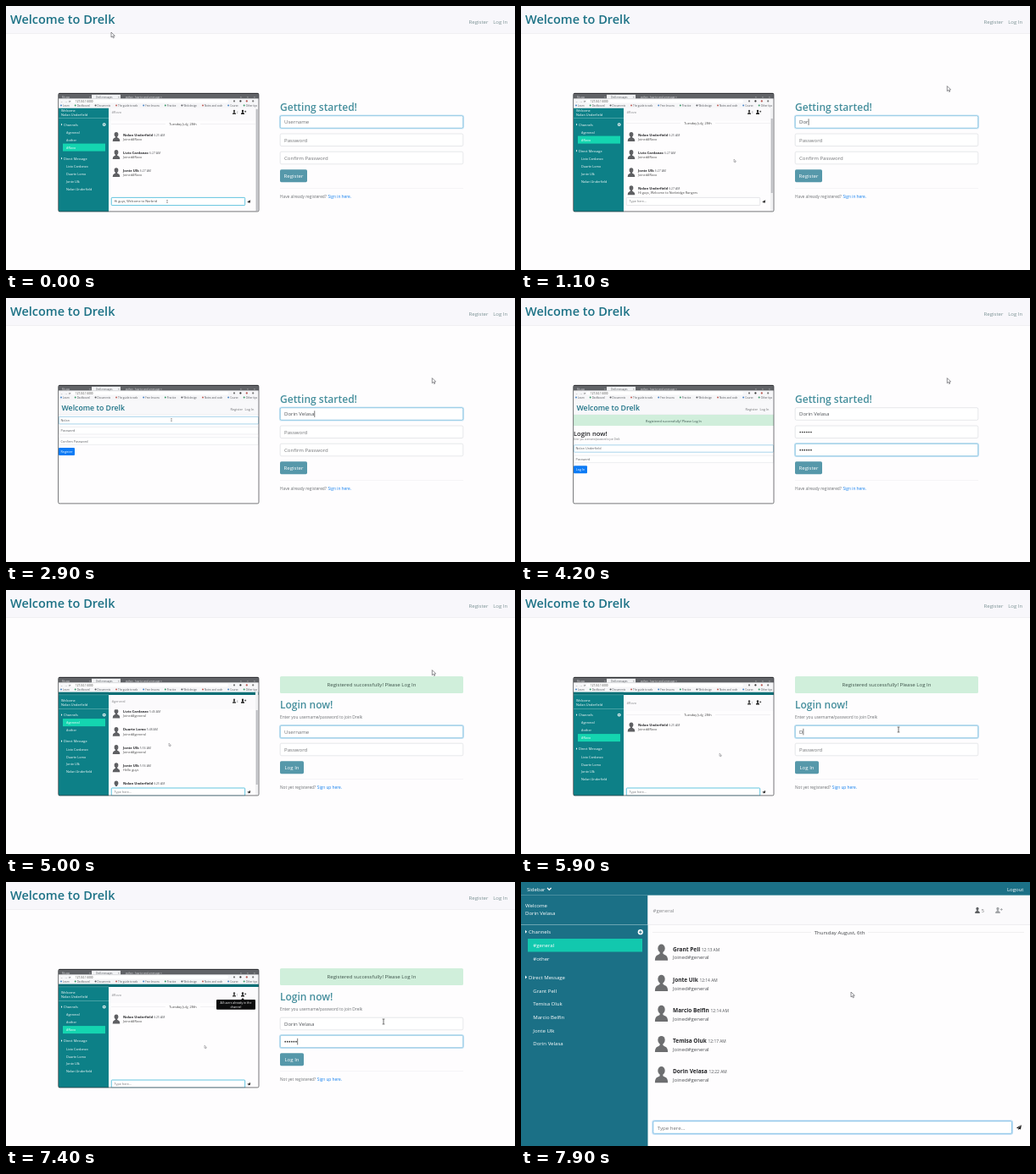
An HTML page with a canvas for the animation above (8 s loop, 600 by 312 pixels).

```html
<!DOCTYPE html>
<html lang="en">
<head>
<meta charset="utf-8">
<title>Chat sign-up demo</title>
<style>
  html, body { margin: 0; width: 100%; height: 100%; overflow: hidden; background: #fefdfe; }
  canvas { display: block; width: 600px; height: 312px; }
</style>
</head>
<body>
<canvas id="stage"></canvas>
<script>
const LOOP = 8000;
const LOGIN_AT = 4700, CHAT_AT = 7600;
const APP = 'Drelk';
const USER = 'Dorin Velasa';
const HOST = 'Nolan Underfield';
const ROOM = '#Rovo';
const MINI_USERS = ['Livio Cardanzo', 'Duarte Lomo', 'Jonte Ulk', HOST];
const TEAL = '#1d7286', HEAD = '#468f9d', MINI_TEAL = '#0d8087';
const GREY = '#717376', DARK = '#222326', BLUE = '#1580ee';

const canvas = document.getElementById('stage');
const dpr = Math.max(1, window.devicePixelRatio || 1);
canvas.width = 600 * dpr;
canvas.height = 312 * dpr;
const c = canvas.getContext('2d');

const clamp = v => Math.max(0, Math.min(1, v));
const span = (t, a, b) => clamp((t - a) / (b - a));
const ease = u => u * u * (3 - 2 * u);
const typed = (s, t, a, b, from = 0) =>
  s.slice(0, from + Math.floor((s.length - from) * span(t, a, b) + 1e-6));

function text(s, x, y, size, color = DARK, weight = 400, align = 'left') {
  c.font = `${weight} ${size}px "Open Sans", "Noto Sans", sans-serif`;
  c.textAlign = align;
  c.fillStyle = color;
  c.fillText(s, x, y);
  return c.measureText(s).width;
}

function rect(x, y, w, h, fill) {
  c.fillStyle = fill;
  c.fillRect(x, y, w, h);
}

function round(x, y, w, h, r, fill, stroke, line = 0.7) {
  c.beginPath();
  c.roundRect(x, y, w, h, r);
  if (fill) { c.fillStyle = fill; c.fill(); }
  if (stroke) { c.strokeStyle = stroke; c.lineWidth = line; c.stroke(); }
}

function poly(points, fill, stroke, line = 0.7) {
  c.beginPath();
  points.forEach(([x, y], i) => i ? c.lineTo(x, y) : c.moveTo(x, y));
  c.closePath();
  if (fill) { c.fillStyle = fill; c.fill(); }
  if (stroke) { c.strokeStyle = stroke; c.lineWidth = line; c.stroke(); }
}

function dot(x, y, r, fill) {
  c.beginPath();
  c.arc(x, y, r, 0, 7);
  c.fillStyle = fill;
  c.fill();
}

function at(x, y, scale, draw) {
  c.save();
  c.translate(x, y);
  c.scale(scale, scale);
  draw();
  c.restore();
}

// Bust icon, 16 wide and 20 high, centred on x, y
function bust(x, y, scale, color = '#6d6e70') {
  at(x, y, scale, () => {
    c.beginPath();
    c.ellipse(0, -5, 4.4, 5.2, 0, 0, 7);
    c.fillStyle = color;
    c.fill();
    rect(-2, -2, 4, 5, color);
    c.beginPath();
    c.moveTo(-8, 10);
    c.quadraticCurveTo(-8, 4, -4.5, 3);
    c.lineTo(-1.8, 1.5);
    c.lineTo(1.8, 1.5);
    c.lineTo(4.5, 3);
    c.quadraticCurveTo(8, 4, 8, 10);
    c.fill();
  });
}

function addUser(x, y, s, color) {
  bust(x, y, s, color);
  rect(x + 8 * s, y - 3.6 * s, 8 * s, 2.4 * s, color);
  rect(x + 10.8 * s, y - 6.4 * s, 2.4 * s, 8 * s, color);
}

function plane(x, y, s) {
  at(x, y, s, () => {
    poly([[3, -3], [-3, 0.4], [-1.4, 1.2]], '#111');
    poly([[3, -3], [-0.9, 1.4], [-0.9, 3], [0.2, 1.8], [1.9, 2.5]], '#111');
  });
}

function plus(x, y, r, bg) {
  dot(x, y, r, '#fff');
  rect(x - r * 0.6, y - r * 0.15, r * 1.2, r * 0.3, bg);
  rect(x - r * 0.15, y - r * 0.6, r * 0.3, r * 1.2, bg);
}

function caretRight(x, y, s) {
  poly([[x, y - s], [x + s, y], [x, y + s]], '#fff');
}

function arrow(x, y, s = 0.95) {
  at(x, y, s, () => poly([[0, 0], [0, 6.3], [1.5, 5], [2.5, 7.2], [3.6, 6.7], [2.6, 4.6], [4.5, 4.5]],
    '#fff', '#5a5a60', 0.7));
}

function beam(x, y, s = 1) {
  at(x, y, s, () => {
    rect(-0.35, -3, 0.7, 6, '#333');
    rect(-1.4, -3.3, 2.8, 0.6, '#333');
    rect(-1.4, 2.7, 2.8, 0.6, '#333');
  });
}

function input(y, value, hint, focus, caret) {
  if (focus > 0) {
    c.globalAlpha = focus;
    round(322.5, y - 0.5, 217, 16, 2.2, null, '#cfe8f7', 1.2);
    c.globalAlpha = 1;
  }
  round(323.2, y + 0.2, 215.6, 14.6, 1.6, '#fff', '#d6d7dc', 0.6);
  if (focus > 0) {
    c.globalAlpha = focus;
    round(323.2, y + 0.2, 215.6, 14.6, 1.6, null, '#7cc5e6', 0.8);
    c.globalAlpha = 1;
  }
  let w = 0;
  if (value[0] === '•') {
    for (let i = 0; i < value.length; i++) dot(329.2 + i * 2.55, y + 7.7, 0.85, '#333');
    w = value.length * 2.55;
  } else if (value) {
    w = text(value, 328, y + 9.8, 6.05, '#4c5055');
  } else {
    text(hint, 328, y + 9.8, 6.05, GREY);
  }
  if (caret) rect(328.2 + w, y + 3.8, 0.6, 7.6, '#222');
}

function button(y, w, label) {
  round(323, y, w, 15, 1.6, '#5698aa');
  text(label, 323 + w / 2, y + 9.8, 6.05, '#fff', 400, 'center');
}

function footer(y, question, link) {
  rect(323, y, 216, 0.5, '#ebeaee');
  const w = text(question + ' ', 323, y + 12.3, 4.8, '#6e7175');
  text(link, 323 + w + 0.4, y + 12.3, 4.8, BLUE);
}

const focusOf = (t, a, b) => Math.min(span(t, a, a + 150), 1 - span(t, b, b + 150));

function registerForm(t) {
  text('Getting started!', 323, 124, 12, HEAD, 600);
  const pass = '••••••';
  const name = t < 2000 ? typed(USER.slice(0, 5), t, 700, 1350) : typed(USER, t, 2000, 2800, 5);
  const caret = (t > 700 && t < 1850) || (t > 2000 && t < 3000);
  input(129.5, name, 'Username', focusOf(t, -200, 3000), caret);
  input(150.8, typed(pass, t, 3100, 3450), 'Password', focusOf(t, 3000, 3550), false);
  input(172, typed(pass, t, 3650, 4050), 'Confirm Password', focusOf(t, 3550, LOGIN_AT), false);
  button(193.2, 32, 'Register');
  footer(215, 'Have already registered?', 'Sign in here.');
}

function loginForm(t) {
  round(323, 102, 216, 20, 1.6, '#d0efdb');
  text('Registered successfully! Please Log In', 431, 114.4, 6.05, '#3c5149', 400, 'center');
  text('Login now!', 323, 140.3, 12, HEAD, 600);
  text(`Enter you username/password to join ${APP}`, 323, 152, 4.8, '#6e7175');
  const tab = 6780;
  input(160, typed(USER, t, 5800, 6600), 'Username', focusOf(t, LOGIN_AT - 150, tab), t > 5700 && t < tab);
  input(181, typed('••••••', t, 6900, 7400), 'Password', focusOf(t, tab, LOOP), t > tab);
  button(202.2, 28, 'Log In');
  footer(223, 'Not yet registered?', 'Sign up here.');
}

// Small recorded browser on the left

function miniBrowser() {
  rect(62, 103, 236, 1.6, '#1c1d20');
  rect(62, 104.6, 236, 5, '#606266');
  rect(101, 104.8, 34, 4.8, '#f1f2f4');
  text('My app', 66, 108.5, 2.7, '#d5d6da');
  text(APP + ' messages', 106, 108.5, 2.7, '#55585d');
  text('python - how to send a message', 141, 108.5, 2.7, '#e2e3e6');
  for (const x of [98, 132, 182, 276, 284, 292]) text('×', x, 108.6, 3.2, x === 132 ? '#555' : '#ddd');
  rect(62, 109.6, 236, 10.9, '#f6f6f8');
  text('←  →  ⟳', 64, 113.6, 3.2, '#555');
  round(77, 110.4, 185, 4, 2, '#fff');
  text('127.0.0.1:5000', 82, 113.6, 3, '#333');
  for (let i = 0; i < 4; i++) dot(269 + i * 7.4, 112.4, 1.1, ['#777', '#333', '#b5534d', '#777'][i]);
  const marks = ['Learn', 'Dashboard', 'Documents', 'The guide to web', 'Free lessons', 'Practice', 'Web design', 'Notes and code', 'Course', 'Other tips'];
  let x = 65;
  marks.forEach((m, i) => {
    dot(x, 117.6, 1, ['#4d87c7', '#3b9a68', '#55585d', '#c0605a'][i % 4]);
    x += text(m, x + 2, 118.6, 2.9, '#55585d') + 9;
  });
}

function miniField(y, h, value, focused) {
  round(62.3, y, 235.4, h, 0.8, '#fff', focused ? '#93cbe6' : '#e3e4e8', focused ? 0.8 : 0.6);
  text(value, 64.5, y + h / 2 + 1.4, 3.75, '#595c61');
}

function miniNav() {
  rect(62, 120, 236, 18, '#f8f8fa');
  rect(62, 137.6, 236, 0.5, '#e6e7ea');
  text('Welcome to ' + APP, 65.5, 132.6, 8.75, TEAL, 600);
  text('Register', 264.5, 132.8, 3.9, GREY);
  text('Log In', 281.5, 132.8, 3.9, GREY);
}

function miniButton(y, w, label) {
  round(62, y, w, 9, 1, '#0d7bf5');
  text(label, 62 + w / 2, y + 5.8, 3.7, '#fff', 400, 'center');
}

function miniRegister(t) {
  miniNav();
  miniField(140.3, 8.6, typed(HOST, t, 2650, 3350), t < 3400);
  miniField(152.4, 8.6, typed('••••••', t, 3400, 3550) || 'Password', t >= 3400 && t < 3600);
  miniField(164.8, 8.6, typed('••••••', t, 3600, 3780) || 'Confirm Password', t >= 3600);
  miniButton(177, 19, 'Register');
  beam(195, 144, 0.55);
}

function miniLogin(t) {
  miniNav();
  rect(62, 138, 236, 13, '#d0eedb');
  text('Registered successfully! Please Log In', 180, 147.4, 3.8, '#35514a', 400, 'center');
  text('Login now!', 62, 162.8, 7.6, DARK, 600);
  text('Enter you username/password to join ' + APP, 62, 168.4, 2.7, GREY);
  miniField(173.8, 8.4, typed(HOST, t, 3900, 4150) || 'Username', t < 4300);
  miniField(186.2, 8.4, typed('••••••', t, 4350, 4550) || 'Password', t >= 4300);
  miniButton(198.2, 16, 'Log In');
}

function miniSidebar(y, rooms, active) {
  rect(62, 120.5, 59, 123, MINI_TEAL);
  text('Welcome', 65, y, 3.9, '#fff');
  text(HOST, 65, y + 5, 3.9, '#fff');
  rect(62, y + 8, 59, 0.5, '#7fc0c3');
  y += 17;
  caretRight(65, y - 1.4, 1.3);
  text('Channels', 68, y, 3.9, '#fff');
  plus(115.7, y - 1.4, 1.9, MINI_TEAL);
  for (const room of rooms) {
    y += 9;
    if (room === active) rect(67, y - 5.9, 50, 9, '#14d5b0');
    text(room, 71, y, 3.8, '#fff');
  }
  y += 13;
  caretRight(65, y - 1.4, 1.3);
  text('Direct Message', 68, y, 3.9, '#fff');
  MINI_USERS.forEach((name, i) => text(name, 71, y + 9.8 + i * 8.8, 3.8, '#fff'));
}

function miniMessage(y, name, time, body) {
  bust(130, y + 1, 0.54, '#5f6063');
  const w = text(name + ' ', 138, y, 4.1, DARK, 700);
  text(time, 138 + w, y, 3.5, '#55575b');
  text(body, 138, y + 5.3, 3.8, '#444');
}

function miniHead(y, room, count) {
  rect(121, 120.5, 177, y - 112, '#fbfafc');
  text(room, 124.5, y, 3.9, '#85878a');
  bust(269, y - 1.6, 0.26, '#444');
  text(count, 271.8, y, 3, GREY);
  addUser(279, y - 1.6, 0.26, '#222');
}

function miniDate(y) {
  rect(124, y - 1.4, 170, 0.4, '#dddde0');
  rect(188, y - 4, 41, 6, '#fefdfe');
  text('Tuesday July, 28th', 208.5, y, 3.9, '#444', 400, 'center');
}

function miniCompose(y, value, focused) {
  rect(121, y - 2, 177, 245 - y, '#fefdfe');
  round(124.3, y, 157.4, 9.2, 0.8, '#fff', focused ? '#52bfdc' : '#d5d6da', focused ? 0.9 : 0.6);
  text(value || 'Type here...', 127.5, y + 6, 3.8, value ? '#444' : GREY);
  plane(286.3, y + 4.7, 0.65);
}

function miniScroll(y, h) {
  rect(294, 120.5, 3.5, 122, '#f1f1f3');
  rect(294.7, y, 2, h, '#bcbdc1');
}

function miniRoom(t) {
  const line = 'Hi guys, Welcome to Norbridge Rangers';
  const sent = t >= 800;
  miniSidebar(124.5, sent ? ['#general', ROOM] : ['#general', '#other', ROOM], ROOM);
  miniHead(127, ROOM, sent ? '3' : '2');
  miniDate(sent ? 140 : 141);
  miniMessage(153.5, HOST, '6:25 AM', 'Joined' + ROOM);
  miniMessage(174.6, MINI_USERS[0], '6:27 AM', 'Joined' + ROOM);
  miniMessage(195.7, MINI_USERS[2], '6:27 AM', 'Joined' + ROOM);
  if (sent) miniMessage(216.8, HOST, '6:27 AM', line);
  miniCompose(226.4, sent ? '' : typed(line, t, 0, 650, 27), !sent);
  miniScroll(sent ? 133 : 122, sent ? 88 : 120);
  if (sent) arrow(251, 181, 0.55);
  else beam(190, 231, 0.55);
}

function miniTop() {
  rect(62, 120.5, 236, 3.5, '#096e75');
  rect(62, 123.7, 59, 0.4, '#7fc0c3');
}

function miniGeneral() {
  miniSidebar(132, ['#general', '#other'], '#general');
  miniMessage(145, MINI_USERS[0], '5:46 AM', 'Joined#general');
  miniMessage(166.4, MINI_USERS[1], '5:48 AM', 'Joined#general');
  miniMessage(187.6, MINI_USERS[2], '5:56 AM', 'Joined#general');
  miniMessage(208.8, MINI_USERS[2], '5:56 AM', 'Hello guys');
  miniMessage(230, HOST, '6:25 AM', 'Joined#general');
  miniHead(132.8, '#general', '4');
  miniTop();
  miniCompose(234, '', true);
  miniScroll(142, 88);
  arrow(192, 181, 0.55);
}

function miniNewRoom(t) {
  miniSidebar(132, ['#general', '#other', ROOM], ROOM);
  miniHead(134.5, ROOM, '1');
  miniTop();
  miniDate(148.5);
  miniMessage(161, HOST, '6:25 AM', 'Joined' + ROOM);
  miniCompose(234, '', true);
  if (t > 6500) {
    round(248, 139, 46, 11.8, 1, '#0c0c0d');
    poly([[277, 139.2], [279, 137], [281, 139.2]], '#0c0c0d');
    text('All users already in the', 271, 143.8, 3.5, '#fff', 400, 'center');
    text('channel', 271, 148.6, 3.5, '#fff', 400, 'center');
  }
  arrow(234, 193, 0.55);
}

function preview(t) {
  c.save();
  c.beginPath();
  c.roundRect(61.5, 103, 236.8, 140.3, 1.8);
  c.clip();
  rect(60, 102, 240, 143, '#fefdfe');
  if (t < 2300) miniRoom(t);
  else if (t < 3850) miniRegister(t);
  else if (t < 4650) miniLogin(t);
  else if (t < 5900) miniGeneral();
  else miniNewRoom(t);
  miniBrowser();
  c.restore();
  round(61.6, 103.2, 236.4, 139.7, 1.6, null, '#3a3b3f', 0.7);
}

function signPage(t) {
  rect(0, 0, 600, 32.5, '#f8f7fb');
  rect(0, 32.2, 600, 0.6, '#e9e8ed');
  text('Welcome to ' + APP, 5, 21.2, 14.5, TEAL, 600);
  text('Register', 545.6, 20.6, 6.05, '#7b9294');
  text('Log In', 574.2, 20.6, 6.05, '#7b9294');
  preview(t);
  if (t < LOGIN_AT) registerForm(t);
  else loginForm(t);
}

function chatPage() {
  rect(0, 0, 149.5, 312, '#1b7086');
  rect(0, 0, 600, 15.5, '#1b7086');
  rect(0, 15.2, 600, 0.7, '#5c9bab');
  const w = text('Sidebar', 7, 10.5, 6.05, '#fff');
  c.beginPath();
  c.moveTo(7 + w + 2.5, 7);
  c.lineTo(7 + w + 4.8, 9.4);
  c.lineTo(7 + w + 7.1, 7);
  c.strokeStyle = '#fff';
  c.lineWidth = 1.2;
  c.stroke();
  text('Logout', 592.5, 10.5, 6.05, '#fff', 400, 'right');

  const people = ['Grant Pell', 'Jonte Ulk', 'Marcio Belfin', 'Temisa Oluk', USER];
  text('Welcome', 5, 29.5, 6.05, '#fff');
  text(USER, 5, 39, 6.05, '#fff');
  rect(0, 50.3, 149.5, 0.7, '#8dbac5');
  caretRight(5, 58.8, 2);
  text('Channels', 9, 61.2, 6.05, '#fff');
  plus(140.8, 59.2, 3.1, '#1b7086');
  rect(8, 67, 135, 15.5, '#12c8ae');
  text('#general', 14.3, 77, 6.05, '#fff');
  text('#other', 14.3, 92.8, 6.05, '#fff');
  caretRight(5, 112.4, 2);
  text('Direct Message', 9, 114.8, 6.05, '#fff');
  [0, 3, 2, 1, 4].forEach((p, i) => text(people[p], 14.3, 130.6 + i * 15.7, 6.05, '#fff'));

  rect(149.5, 16, 450.5, 34.5, '#fbfafc');
  rect(149.5, 50.4, 450.5, 0.6, '#e6e5e9');
  text('#general', 155.5, 35.8, 6.05, '#85878a');
  bust(538, 33.3, 0.36, '#5f6164');
  text('5', 542.8, 35.8, 5.6, GREY);
  addUser(562, 33.3, 0.36, '#a3a5a8');

  rect(155, 59.3, 187, 0.5, '#e0e0e3');
  rect(409, 59.3, 184, 0.5, '#e0e0e3');
  text('Thursday August, 6th', 375.5, 61.6, 6.05, '#3f4145', 400, 'center');
  const times = ['12:13', '12:14', '12:14', '12:17', '12:22'];
  people.forEach((name, i) => {
    const y = 82 + i * 36.1;
    bust(165.5, y + 1.3, 0.95);
    const n = text(name + ' ', 179, y, 6.5, DARK, 700);
    text(times[i] + ' AM', 179 + n, y, 4.9, '#4c4f53');
    text('Joined#general', 179, y + 9.4, 6.05, '#4c4f53');
  });

  round(155, 281.9, 424.4, 16.2, 2, null, '#c3e0f5', 1.4);
  round(155.8, 282.7, 422.8, 14.6, 1.5, '#fff', '#78bbe6', 0.9);
  text('Type here...', 160.8, 292.5, 6.05, GREY);
  plane(587, 290, 1);
}

function pointer(t) {
  const path = [
    [0, 700, 124, 31, 502.3, 94.6],
    [5150, 5650, 502.3, 94.6, 445, 165],
    [7450, 7850, 445, 165, 389, 130]
  ];
  const [a, b, x0, y0, x1, y1] = t < 4000 ? path[0] : t < 7400 ? path[1] : path[2];
  const u = ease(span(t, a, b));
  const x = x0 + (x1 - x0) * u, y = y0 + (y1 - y0) * u;
  if (t > 5600 && t < 7450) beam(x, y);
  else arrow(x, y);
}

const start = performance.now();
function frame(now) {
  const t = Math.max(0, now - start) % LOOP;
  c.setTransform(dpr, 0, 0, dpr, 0, 0);
  rect(0, 0, 600, 312, '#fefdfe');
  if (t < CHAT_AT) signPage(t);
  else chatPage();
  pointer(t);
  requestAnimationFrame(frame);
}
requestAnimationFrame(frame);
</script>
</body>
</html>
```
